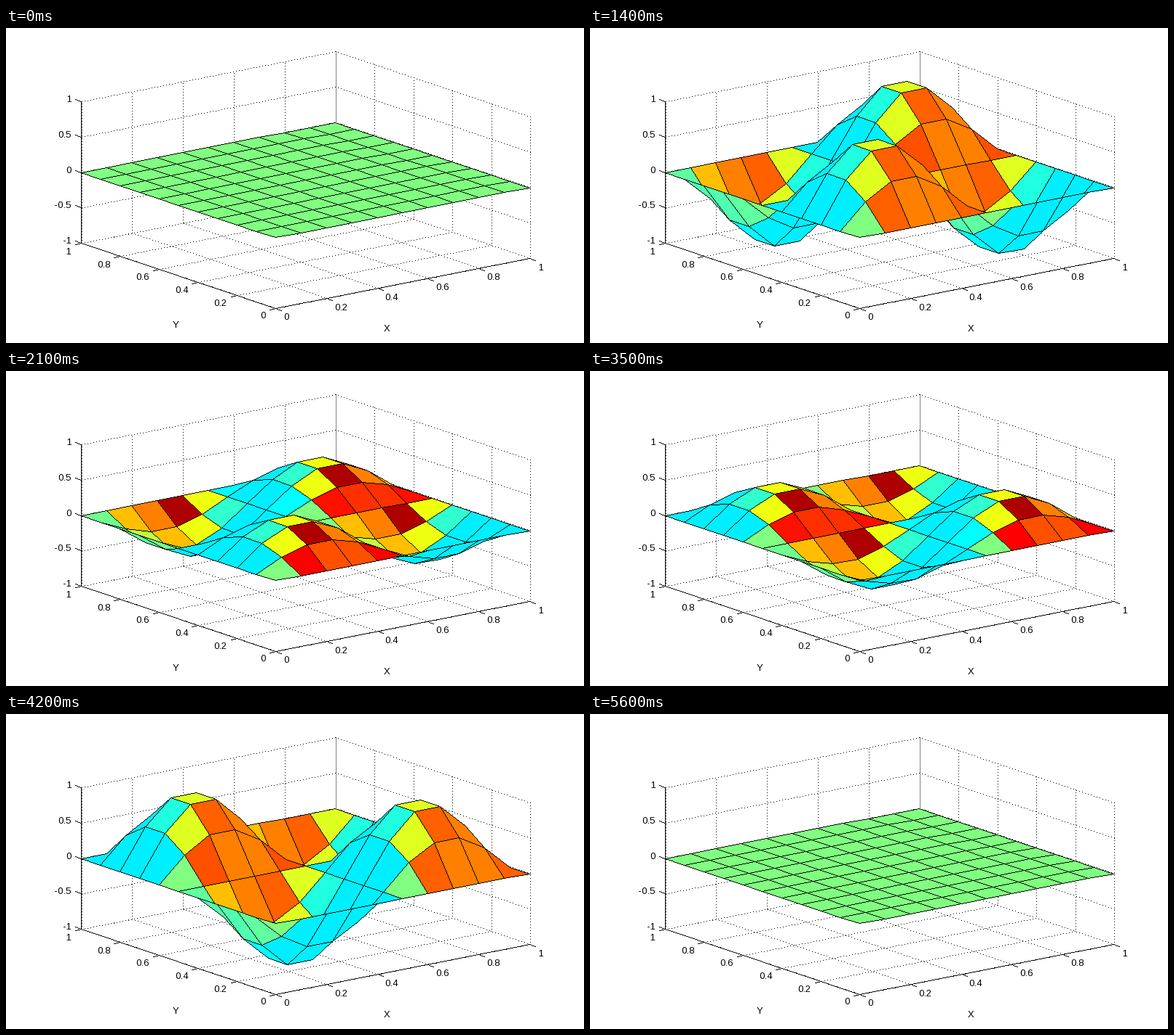
Write a matplotlib script that moves like this. It is 794 px wide and 434 px high and loops after 6.3 s.

```python
import numpy as np
import matplotlib.pyplot as plt
from matplotlib.animation import FuncAnimation
from matplotlib.collections import PolyCollection

W, H, DPI = 794, 434, 100
N = 10
FONT = 13.33 * 72 / DPI

plt.rcParams["font.family"] = "Liberation Sans"
plt.rcParams["text.hinting_factor"] = 1

LEVELS = [0, 0.49, 1, 0.49, 0, -0.49, -1, -0.49, 0]

# Viewer, and a light turned 45 degrees to the viewer's right
AZ, EL = np.radians([37.5, 30])
VIEW = np.array([-np.sin(AZ) * np.cos(EL), -np.cos(AZ) * np.cos(EL),
                 np.sin(EL)])
RIGHT = np.array([np.cos(AZ), -np.sin(AZ), 0])
LIGHT = (VIEW + RIGHT) / np.sqrt(2)
AMBIENT, DIFFUSE, SPECULAR, SHINE = 0.55, 0.6, 0.4, 10


def project(x, y, z):
    """Orthographic view of the unit box in pixels."""
    u = 370 + 349 * x - 267.3 * y
    v = 288.5 - 69 * x - 89.8 * y - 97.5 * z
    return np.array([u, v])


def stair(p, q):
    """Outline of a one pixel wide, unsmoothed line between two pixels."""
    p, q = np.round(p), np.round(q)
    main = int(np.argmax(np.abs(q - p)))
    if p[main] > q[main]:
        p, q = q, p
    n = int(q[main] - p[main]) + 1
    side = np.floor(np.linspace(p[1 - main], q[1 - main], n) + 0.5)
    along = p[main] + np.arange(n + 1)
    a = np.repeat(along, 2)[1:-1]
    s = np.repeat(side, 2)
    pts = np.empty((4 * n, 2))
    pts[:, main] = np.concatenate([a, a[::-1]])
    pts[:, 1 - main] = np.concatenate([s, s[::-1] + 1])
    return pts


fig = plt.figure(figsize=(W / DPI, H / DPI), dpi=DPI, facecolor="white")
ax = fig.add_axes([0, 0, 1, 1])
ax.set_xlim(0, W)
ax.set_ylim(H, 0)
ax.axis("off")


def dotted(*corners):
    """A dot every four pixels along a bent line."""
    phase = 0
    for a, b in zip(corners, corners[1:]):
        p, q = project(*a), project(*b)
        length = np.abs(q - p).max()
        d = np.arange(phase, length + 0.5, 4)
        pts = np.round(p + np.outer(d / length, q - p)) + 0.5
        ax.plot(pts[:, 0], pts[:, 1], ",", color="black", zorder=1)
        phase = d[-1] + 4 - length


def label(x, y, s, ha="center"):
    ax.text(x, y, s, size=FONT, ha=ha, va="center_baseline", zorder=4)


def draw_box():
    for t in np.linspace(0, 1, 6):
        dotted((t, 0, -1), (t, 1, -1), (t, 1, 1))
        dotted((0, t, -1), (1, t, -1), (1, t, 1))
    for z in np.linspace(-1, 1, 5):
        dotted((1, 0, z), (1, 1, z), (0, 1, z))

    front, left = project(0, 0, -1), project(0, 1, -1)
    lines = [(front, project(1, 0, -1)), (front, left),
             (left, project(0, 1, 1))]
    for k, t in enumerate(np.linspace(0, 1, 6)):
        p, q = project(t, 0, -1), project(0, t, -1)
        lines += [(p, p + (8, 3)), (q, q + (-8, 2))]
        s = f"{t:.1g}"
        shift = 5 if 0 < k < 5 else 0
        label(385 + 70 * k + shift, 398 - 13.8 * k, s)
        label(353 - 53.4 * k - shift, 396 - 17.7 * k, s)
    for z in np.linspace(-1, 1, 5):
        p = project(0, 1, z)
        lines.append((p, p + (-8, -3)))
        label(90, p[1] - 3.5, f"{z:g}", "right")
    label(523, 414, "X")
    label(233, 408.5, "Y")
    ax.add_collection(PolyCollection([stair(p, q) for p, q in lines],
                                     facecolors="black", linewidths=0,
                                     zorder=2), autolim=False)


def shade(z):
    """Brightness of each grid point: ambient, diffuse and specular light."""
    dx, dy = np.gradient(z, 1 / N, edge_order=2)
    normal = np.stack([-dx, -dy, np.ones_like(z)], axis=-1)
    normal /= np.linalg.norm(normal, axis=-1, keepdims=True)
    lit, seen = normal @ LIGHT, normal @ VIEW
    gloss = np.maximum(2 * lit * seen - LIGHT @ VIEW, 0) ** SHINE
    gloss[lit < 0] = 0
    total = AMBIENT + DIFFUSE * np.maximum(lit, 0) + SPECULAR * gloss
    return total / (AMBIENT + DIFFUSE + SPECULAR)


def jet(value):
    """Rainbow map in 64 steps."""
    k = np.clip(np.floor(value * 64) + 1, 1, 64)
    return np.clip(1.5 - np.abs(k - np.array([48, 32, 16])) / 16, 0, 1)


draw_box()
grid = np.linspace(0, 1, N + 1)
gx, gy = np.meshgrid(grid, grid, indexing="ij")
mode = np.sin(2 * np.pi * gx) * np.sin(2 * np.pi * gy)
# Far cells first, so that near ones cover them
cells = [(i, j) for i in reversed(range(N)) for j in reversed(range(N))]

surface = PolyCollection([], linewidths=0, zorder=3)
ax.add_collection(surface, autolim=False)


def update(frame):
    z = LEVELS[frame] * mode
    points = np.round(np.moveaxis(project(gx, gy, z), 0, -1))
    light = shade(z)
    shapes, colors = [], []
    for i, j in cells:
        ring = [points[c] for c in
                [(i, j), (i + 1, j), (i + 1, j + 1), (i, j + 1)]]
        shapes.append(np.array(ring) + 0.5)
        colors.append(jet(light[i, j]))
        for p, q in zip(ring, ring[1:] + ring[:1]):
            shapes.append(stair(p, q))
            colors.append(np.zeros(3))
    surface.set_verts(shapes)
    surface.set_facecolor(colors)
    return (surface,)


anim = FuncAnimation(fig, update, frames=len(LEVELS), interval=700,
                     repeat=True, repeat_delay=0, blit=False)
plt.show()
```
